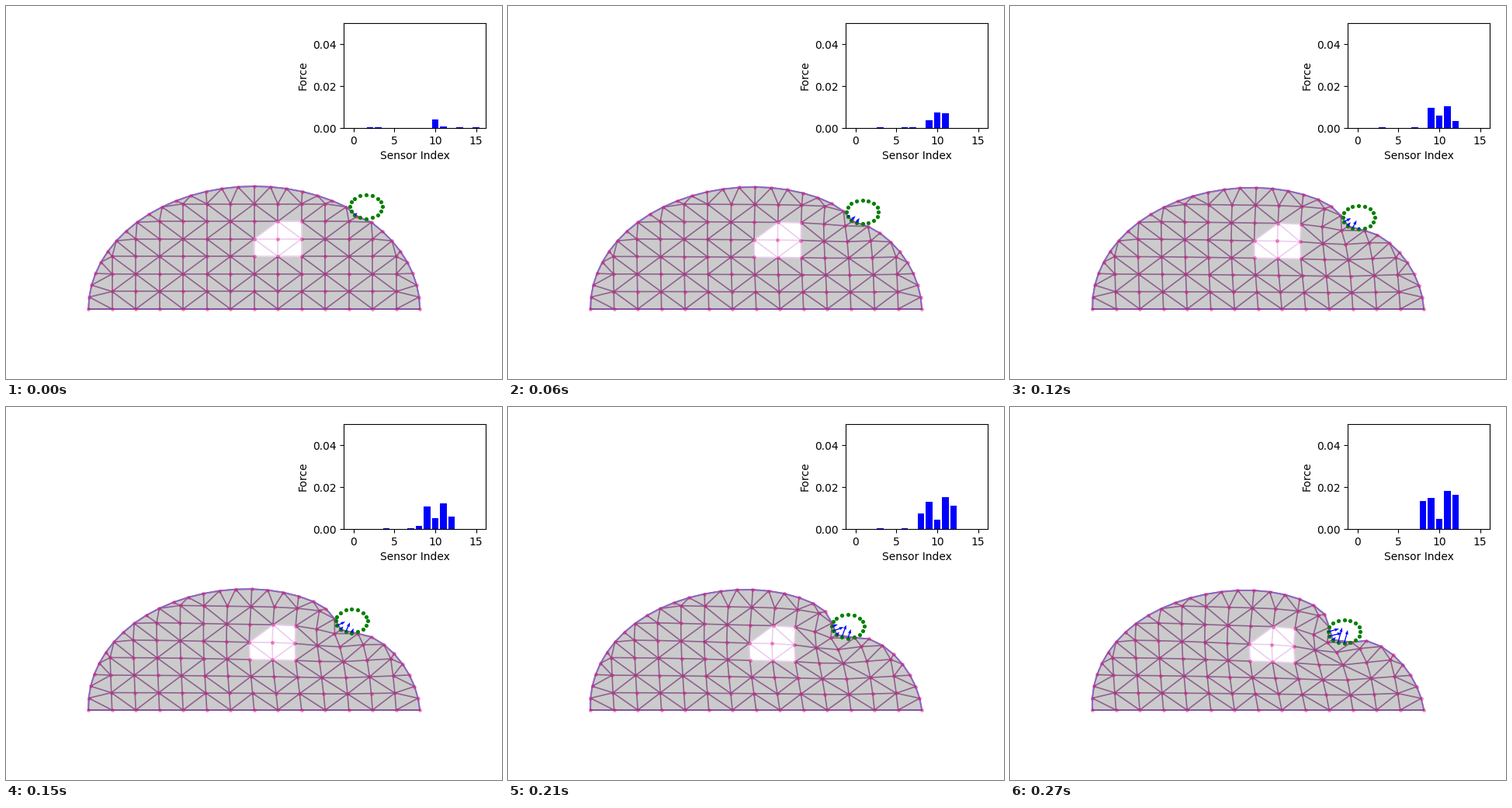
Recreate the animation shown at these times as a matplotlib script. Size 639 px wide and 480 px high, loop 0.3 s.

```python
import numpy as np
import matplotlib.pyplot as plt
from matplotlib.animation import FuncAnimation
from matplotlib.collections import LineCollection, PolyCollection
from matplotlib.tri import Triangulation

W, H, FRAMES = 639, 480, 10
CX, BASE, UX, UY = 319.7, 390, 30.5, 22.57   # origin and grid cell in pixels
R, ARC = 7, 32                               # dome radius in cells, arc segments
RX, RY = 20.6, 15.2                          # probe radii in pixels

GREY, WHITE = "#cbcbcb", "#ffffff"
EDGE, PALE, RIM = "#8f6191", "#eccdf0", "#8f66c4"


def to_px(p):
    return np.column_stack([CX + UX * p[:, 0], BASE - UY * p[:, 1]])


def probe_centre(n):
    return np.array([464 - 3.72 * n, 258.3 + 3.43 * n])


# --- mesh ---------------------------------------------------------------
theta = np.pi * np.arange(ARC + 1) / ARC
arc = R * np.column_stack([np.cos(theta), np.sin(theta)])
grid = [(i, j) for j in range(R) for i in range(-6, 7) if np.hypot(i, j) < 6.9]
index = {g: ARC + 1 + m for m, g in enumerate(grid)}
nodes = np.round(np.vstack([arc, grid]), 9)


def build_triangles():
    cells = {(i, j) for i, j in grid
             if {(i + 1, j), (i, j + 1), (i + 1, j + 1)} <= index.keys()}
    tris = []
    for t in Triangulation(nodes[:, 0], nodes[:, 1]).triangles:
        cell = tuple(int(c) for c in np.floor(nodes[t].mean(axis=0)))
        if cell not in cells:
            tris.append(tuple(int(k) for k in t))
    # full cells: union-jack diagonals, mirrored outside the central block
    for i, j in sorted(cells):
        a, b = index[i, j], index[i + 1, j]
        c, d = index[i + 1, j + 1], index[i, j + 1]
        outer = abs(i + .5) > 2 or j < 1
        if (i + j + outer) % 2 == 0:
            tris += [(a, b, c), (a, c, d)]
        else:
            tris += [(a, b, d), (b, c, d)]
    return np.array(tris)


def in_hole(t):
    x, y = nodes[t].mean(axis=0)
    return 0 < x < 2 and 3 < y < 5 and y - x < 4


def edges_of(ts):
    return {tuple(sorted((int(t[a]), int(t[b]))))
            for t in ts for a, b in ((0, 1), (1, 2), (2, 0))}


tris = build_triangles()
hole = np.array([in_hole(t) for t in tris])
fill = [WHITE if h else GREY for h in hole]
pale_edges = edges_of(tris[hole])
dark_edges = np.array(sorted(edges_of(tris[~hole]) - pale_edges))
pale_edges = np.array(sorted(pale_edges))
base_row = [ARC] + [index[i, 0] for i in range(-6, 7)] + [0]

# --- deformation: final shift in pixels at key nodes, smooth in between --
SKIN = {4: (-11, 2), 6: (-19, 6), 7: (-25.5, 11), 8: (-31, 24), 9: (-38.5, 31),
        10: (-27, 25), 11: (-15, 16), 13: (-8.5, 8.5), 16: (-5.5, 4), 24: (-6.5, .3)}
CORE = {(0, 4): (-11.5, 5.5), (2, 3): (-13.5, 7), (2, 5): (-13.5, 8),
        (4, 4): (-21, 16), (4, 5): (-33, 26), (4, 2): (-7, 6.5), (-2, 2): (-4.5, 2)}


def thin_plate(p, q):
    r2 = ((p[:, None] - q[None]) ** 2).sum(axis=2)
    return r2 * np.log(r2 + 1e-12)


def spread(sites, shifts, points):
    """Thin-plate interpolation of the shifts over all points."""
    ones = np.column_stack([np.ones(len(sites)), sites])
    system = np.block([[thin_plate(sites, sites), ones],
                       [ones.T, np.zeros((3, 3))]])
    coef = np.linalg.solve(system, np.vstack([shifts, np.zeros((3, 2))]))
    basis = np.column_stack([thin_plate(points, sites), np.ones(len(points)), points])
    return basis @ coef


fixed = base_row[::2]
picked = [*SKIN, *(index[g] for g in CORE), *fixed]
shifts = np.array([*SKIN.values(), *CORE.values(), *[(0, 0)] * len(fixed)], float)
rest = to_px(nodes)
drift = spread(nodes[picked], shifts, nodes)
drift[base_row] = 0


def pose(n):
    p = rest + drift * n / (FRAMES - 1)
    # keep the skin outside the probe
    c = probe_centre(n)
    off = (p[:ARC + 1] - c) / (RX, RY)
    dist = np.maximum(np.hypot(off[:, 0], off[:, 1]), 1e-6)
    inside = dist < 1
    p[:ARC + 1][inside] = c + (off / dist[:, None])[inside] * (RX, RY)
    return p


# --- forces: (step, thousandths) where each sensor's slope changes -------
FORCE = {8: [(4.55, 0), (9, 13.2)],
         9: [(.8, 0), (4, 9.5), (6, 12.1), (9, 15)],
         10: [(0, 4), (2, 7.3), (6, 4.3), (9, 5)],
         11: [(0, .6), (2, 7), (6, 14), (9, 18.2)],
         12: [(2.7, 0), (9, 16.3)]}
contact = np.array(list(FORCE))


def forces(n):
    f = np.where(np.random.default_rng(n).random(16) < .25, .0004, 0)
    for k, knots in FORCE.items():
        f[k] = max(f[k], np.interp(n, *zip(*knots)) / 1000)
    return f


def arrow_angles(n):
    """Directions fan out from the diagonal, then line up with two flat sides."""
    u = n / (FRAMES - 1)
    k = contact - 10
    return np.radians(45 + (1 - u) * 8 * k + u * 30 * np.sign(k))


# --- figure -------------------------------------------------------------
fig = plt.figure(figsize=(W / 100, H / 100), dpi=100, facecolor="white")
ax = fig.add_axes([0, 0, 1, 1])
ax.set_xlim(0, W)
ax.set_ylim(H, 0)
ax.axis("off")

faces = PolyCollection(rest[tris], facecolors=fill, edgecolors=fill,
                       linewidths=.4, zorder=1)
dark = LineCollection([], colors=EDGE, linewidths=1.2, zorder=2)
pale = LineCollection([], colors=PALE, linewidths=1.2, zorder=2)
for part in (faces, dark, pale):
    ax.add_collection(part)
rim, = ax.plot([], [], color=RIM, lw=1.4, zorder=3)
ax.plot(*rest[base_row].T, color="#84509f", lw=1.3, zorder=3)
dots = ax.scatter(*rest.T, s=12, color="#e6006e", alpha=.45, linewidths=0, zorder=4)

phi = 2 * np.pi * np.arange(16) / 16
ring = np.column_stack([RX * np.cos(phi), -RY * np.sin(phi)])
probe = ax.scatter(*ring.T, s=14, color="green", linewidths=0, zorder=5)
arrows = ax.quiver(*ring[contact].T, np.ones(5), np.ones(5), color="blue",
                   units="dots", width=1.3, scale_units="dots", scale=1,
                   headwidth=3.2, headlength=4.5, headaxislength=4, zorder=6)

chart = fig.add_axes([435.2 / W, 1 - 157.1 / H, 183 / W, 135 / H])
bars = chart.bar(range(16), np.zeros(16), color="blue")
chart.set_xlim(-1.19, 16.19)
chart.set_ylim(0, .05)
chart.set_xticks([0, 5, 10, 15])
chart.set_yticks([0, .02, .04], ["0.00", "0.02", "0.04"])
chart.set_xlabel("Sensor Index")
chart.set_ylabel("Force")


def draw(n):
    p = pose(n)
    faces.set_verts(p[tris])
    dark.set_segments(p[dark_edges])
    pale.set_segments(p[pale_edges])
    rim.set_data(*p[:ARC + 1].T)
    dots.set_offsets(p)

    sensors = probe_centre(n) + ring
    probe.set_offsets(sensors)
    f = forces(n)
    for bar, value in zip(bars, f):
        bar.set_height(value)

    turn = arrow_angles(n)
    size = np.ma.masked_less(f[contact] * 1100, .9)
    arrows.set_offsets(sensors[contact])
    arrows.set_UVC(size * np.cos(turn), size * np.sin(turn))
    return faces, dark, pale, rim, dots, probe, arrows, *bars


anim = FuncAnimation(fig, draw, frames=FRAMES, interval=30, repeat=True,
                     repeat_delay=0, blit=False)
plt.show()
```
